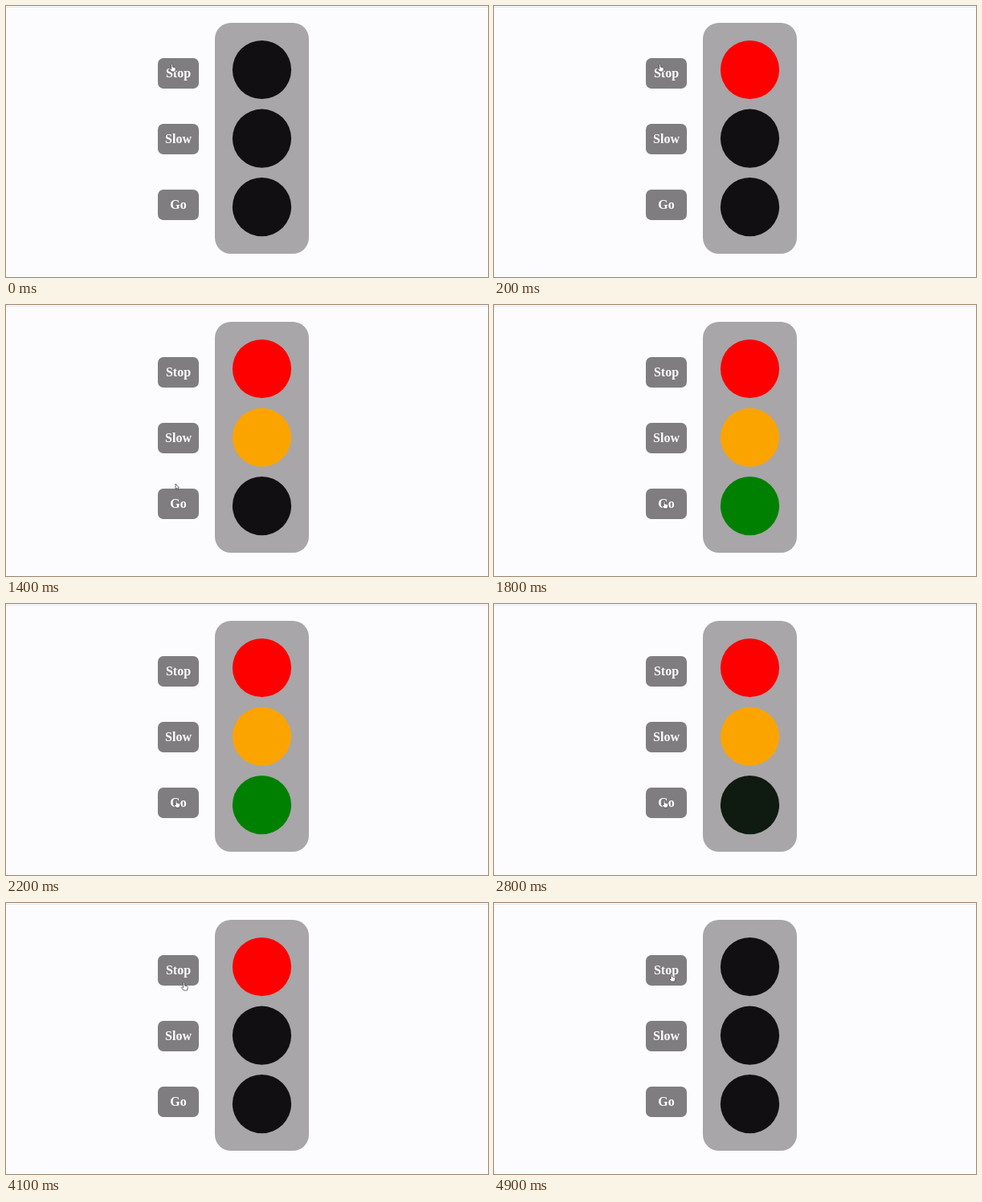
Write an HTML page that moves like this. It is 600x338 px and loops after 5000 ms.

```html
<!DOCTYPE html>
<html lang="en">
<head>
<meta charset="utf-8">
<title>Traffic light</title>
<style>
  html, body { margin: 0; width: 100%; height: 100%; overflow: hidden; background: #fcfbfe; }
  svg { display: block; width: 600px; height: 338px; }
  text { font: bold 16px "Liberation Serif", "Times New Roman", serif; fill: #fff; text-anchor: middle; }
  .button { fill: #807d80; }
  .cursor path { fill: #fff; stroke: #333; stroke-width: .7; stroke-linejoin: round; }
</style>
</head>
<body>
<svg viewBox="0 0 600 338">
  <rect width="600" height="338" fill="#fcfbfe"/>
  <rect y="1" width="600" height="1" fill="#e7e6e9"/>
  <rect x="260" y="21" width="117" height="288" rx="20" fill="#a8a6a8"/>
  <g id="lights"></g>
  <g id="buttons"></g>
  <g id="cursor" class="cursor">
    <path id="hand" d="M-.9 .9Q0 -.5 .9 .9V4L4 4.8Q5 5.2 4.8 6.5L4 10H-.4L-3 6.6Q-2.5 5.3 -.9 6.6Z"/>
    <path id="arrow" d="M0 0V6.8L1.6 5.4L2.6 7.6L3.6 7.1L2.7 5H4.5Z"/>
  </g>
</svg>
<script>
const LOOP = 5000, STEP = 100, FADE_IN = 150, FADE_OUT = 350;
const OFF = [17, 15, 18];

const lamps = [
  { y: 79.5, rgb: [254, 0, 0], on: 50, off: 4550 },
  { y: 165.2, rgb: [251, 164, 0], on: 850, off: 3500 },
  { y: 250.6, rgb: [0, 128, 0], on: 1650, off: 2560 }
];
const buttons = [
  { label: 'Stop', y: 65 },
  { label: 'Slow', y: 147 },
  { label: 'Go', y: 229 }
];
// time, x and y of the pointer tip
const path = [
  [0, 206.5, 72], [300, 206.5, 72], [600, 207, 150], [700, 208, 162],
  [1200, 208, 162], [1400, 211, 223], [1600, 212, 244],
  [2800, 212, 244], [3000, 212, 200], [3200, 214, 167],
  [3700, 214, 167], [4000, 219, 112], [4100, 221.5, 99],
  [4300, 221, 88], [5000, 221, 88]
];

const $ = id => document.getElementById(id);

function add(parent, tag, attrs, text = '') {
  const el = document.createElementNS('http://www.w3.org/2000/svg', tag);
  for (const key in attrs) el.setAttribute(key, attrs[key]);
  el.textContent = text;
  return parent.appendChild(el);
}

for (const lamp of lamps) {
  lamp.el = add($('lights'), 'circle', { cx: 318.5, cy: lamp.y, r: 36.6 });
}
for (const { label, y } of buttons) {
  add($('buttons'), 'rect', { class: 'button', x: 189, y, width: 51, height: 38, rx: 7 });
  add($('buttons'), 'text', { x: 214.5, y: y + 24 }, label);
}

function ease(t, start, length) {
  const p = Math.min(1, Math.max(0, (t - start) / length));
  return 1 - (1 - p) ** 2;
}

const mix = (a, b, p) => a + (b - a) * p;

function pointerAt(t) {
  const i = path.findIndex(point => point[0] > t);
  const [t0, x0, y0] = path[i - 1], [t1, x1, y1] = path[i];
  const p = (t - t0) / (t1 - t0);
  return [mix(x0, x1, p), mix(y0, y1, p)];
}

function draw(t) {
  for (const { el, rgb, on, off } of lamps) {
    const level = ease(t, on, FADE_IN) - ease(t, off, FADE_OUT);
    el.setAttribute('fill', `rgb(${OFF.map((c, i) => Math.round(mix(c, rgb[i], level)))})`);
  }
  const [x, y] = pointerAt(t);
  const over = buttons.some(b => y >= b.y && y <= b.y + 38);
  $('cursor').setAttribute('transform', `translate(${x} ${y})`);
  $('hand').style.display = over ? '' : 'none';
  $('arrow').style.display = over ? 'none' : '';
}

const start = performance.now();

function tick() {
  const t = (performance.now() - start) % LOOP;
  draw(Math.floor(t / STEP) * STEP);
  requestAnimationFrame(tick);
}
tick();
</script>
</body>
</html>
```
